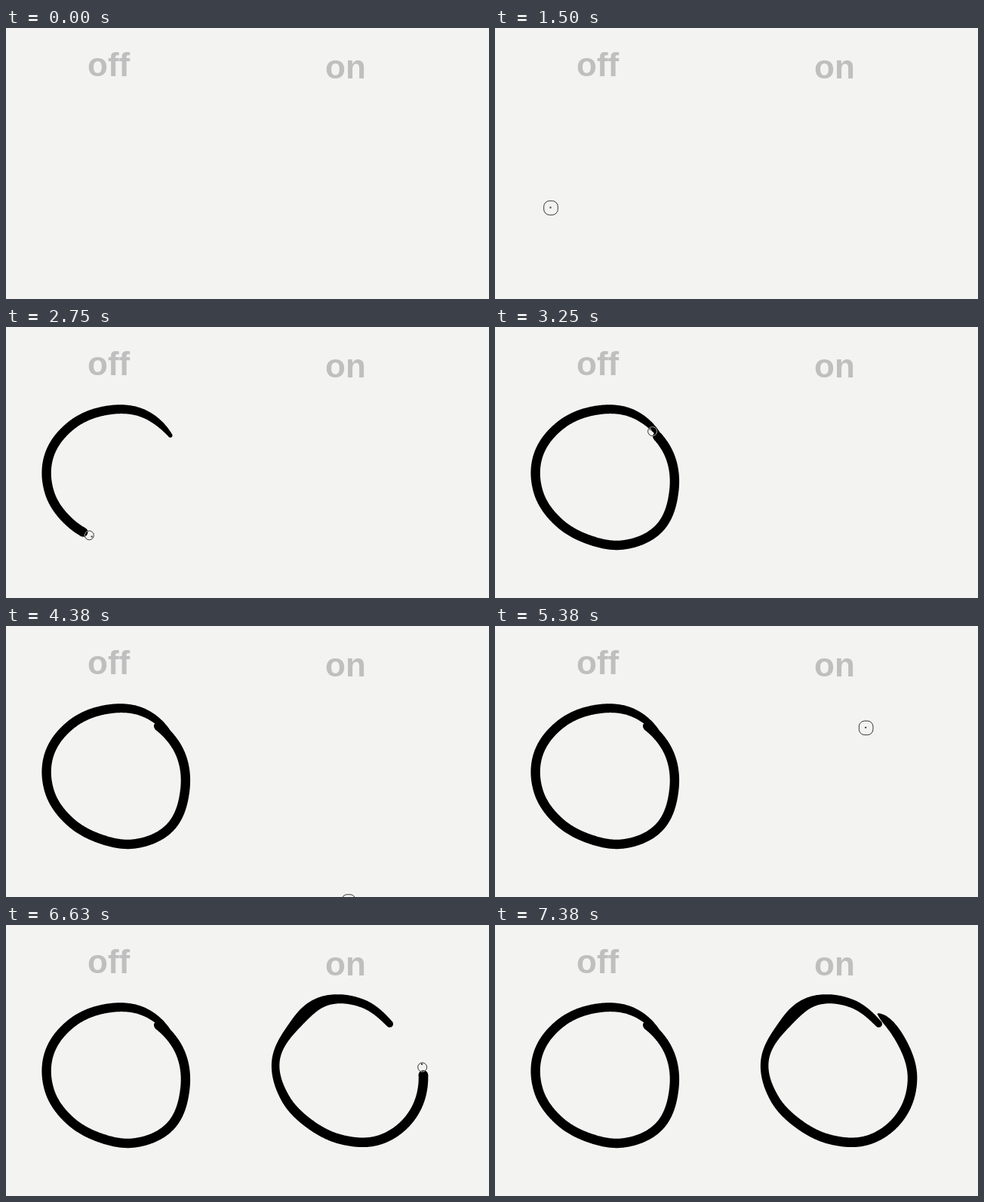
An HTML page with a canvas that plays this animation: 640x360 px, repeating every 9.51 s.

```html
<!DOCTYPE html>
<html lang="en">
<head>
<meta charset="utf-8">
<title>off / on</title>
<style>
  html, body { margin: 0; height: 100%; overflow: hidden; background: #f3f3f1; }
  canvas { display: block; }
</style>
</head>
<body>
<canvas id="stage" width="640" height="360"></canvas>
<script>
const ctx = document.getElementById('stage').getContext('2d');
const LOOP = 9510, STEPS = 8, SAMPLES = 600;

const bump = (u, mid, width) => Math.exp(-(((u - mid) / width) ** 2));
const easeOut = (s, power) => 1 - (1 - s) ** power;

// Hand-drawn rings, traced counter-clockwise from an angle in degrees.
// radii are evenly spaced along the sweep; half is the brush's half width.
const rings = [
  {
    first: 20, power: 1.65, cx: 146, cy: 200, from: -38, sweep: 372,
    radii: [91, 92.4, 90, 91.3, 93.5, 90.5, 85.6, 85.3, 92.8, 98.3, 93, 90.3, 87.3],
    half: u => 6.2 - 3.4 * Math.exp(-u / 0.05)
  },
  {
    first: 48, power: 1.32, cx: 456, cy: 194, from: -50, sweep: 365.4,
    radii: [81.6, 91.5, 99, 95.5, 99.5, 93.3, 88.4, 91.8, 99.5, 101, 97.5, 91.5, 91.7],
    half: u => 6.3 - 1.7 * Math.exp(-u / 0.1) + 2.2 * bump(u, 0.21, 0.05)
      - bump(u, 0.34, 0.07) - 5 * Math.exp((u - 1) / 0.015)
  }
];

// Pointer flights: quadratic curves shown for a number of ticks.
const flights = [
  { first: 12, count: 8, power: 3, path: [[74, 239], [190, 58], [220.5, 147.5]] },
  { first: 27, count: 3, power: 1, path: [[198, 139], [260, 190], [349, 302]] },
  { first: 35, count: 1, power: 1, path: [[454, 366], [454, 366], [454, 366]] },
  { first: 40, count: 8, power: 3, path: [[467, 318], [461, 124], [507, 131]] },
  { first: 55, count: 4, power: 1, path: [[505, 116], [485, 175], [445, 247]] }
];

// Catmull-Rom through evenly spaced values.
function spline(values, u) {
  const last = values.length - 1;
  const i = Math.min(last - 1, Math.floor(u * last)), f = u * last - i;
  const [a, b, c, d] = [-1, 0, 1, 2].map(k => values[Math.max(0, Math.min(last, i + k))]);
  return b + f / 2 * (c - a + f * (2 * a - 5 * b + 4 * c - d + f * (3 * (b - c) + d - a)));
}

function pointOn(ring, n) {
  const u = n / SAMPLES;
  const angle = (ring.from - ring.sweep * u) * Math.PI / 180;
  const r = spline(ring.radii, u);
  return [ring.cx + r * Math.cos(angle), ring.cy + r * Math.sin(angle), ring.half(u)];
}

function dot([x, y, r]) {
  ctx.beginPath();
  ctx.arc(x, y, r, 0, 7);
  ctx.fill();
}

function paint(points) {
  const left = [], right = [];
  for (let i = 1; i < points.length; i++) {
    const [x, y, r] = points[i];
    const dx = x - points[i - 1][0], dy = y - points[i - 1][1];
    const k = r / Math.hypot(dx, dy);
    left.push([x - dy * k, y + dx * k]);
    right.unshift([x + dy * k, y - dx * k]);
  }
  ctx.fillStyle = '#000';
  ctx.beginPath();
  for (const p of [...left, ...right]) ctx.lineTo(...p);
  ctx.fill();
  dot(points[0]);
  dot(points[points.length - 1]);
}

// The pointer inverts what lies below it.
function pointer(x, y, half, corner, dx, dy) {
  ctx.save();
  ctx.globalCompositeOperation = 'difference';
  ctx.strokeStyle = ctx.fillStyle = '#bbb';
  ctx.beginPath();
  ctx.roundRect(x - half, y - half, 2 * half, 2 * half, corner);
  ctx.stroke();
  ctx.fillRect(x + dx - 1, y + dy - 1, 2, 2);
  ctx.restore();
}

function drawRing(ring, tick) {
  const step = tick - ring.first + 1;
  if (step < 1) return;
  const head = Math.round(SAMPLES * easeOut(Math.min(1, step / STEPS), ring.power));
  paint(Array.from({ length: head + 1 }, (_, n) => pointOn(ring, n)));
  if (step >= STEPS) return;
  const tip = Math.min(SAMPLES, head + 10);
  const [x, y] = pointOn(ring, tip), [px, py] = pointOn(ring, tip - 4);
  pointer(x, y, 6, 6, x - px, y - py);
}

function drawFlight({ first, count, power, path }, tick) {
  const n = tick - first;
  if (n < 0 || n >= count) return;
  const s = easeOut(n / Math.max(1, count - 1), power);
  const [x, y] = [0, 1].map(k =>
    (1 - s) ** 2 * path[0][k] + 2 * s * (1 - s) * path[1][k] + s * s * path[2][k]);
  pointer(x, y, 9.3, 7.5, -0.5, -0.5);
}

function draw(t) {
  // Ticks of 125 ms, rounded up to 10 ms.
  const tick = 2 * Math.floor(t / 250) + (t % 250 >= 130 ? 1 : 0);
  ctx.fillStyle = '#f3f3f1';
  ctx.fillRect(0, 0, 640, 360);
  ctx.fillStyle = '#bfbfbf';
  ctx.font = 'bold 44px "Liberation Sans", Arial, sans-serif';
  ctx.fillText('off', 108, 64);
  ctx.fillText('on', 423, 67);
  rings.forEach(ring => drawRing(ring, tick));
  flights.forEach(flight => drawFlight(flight, tick));
}

function frame(now) {
  draw(now % LOOP);
  requestAnimationFrame(frame);
}
draw(0);
requestAnimationFrame(frame);
</script>
</body>
</html>
```
